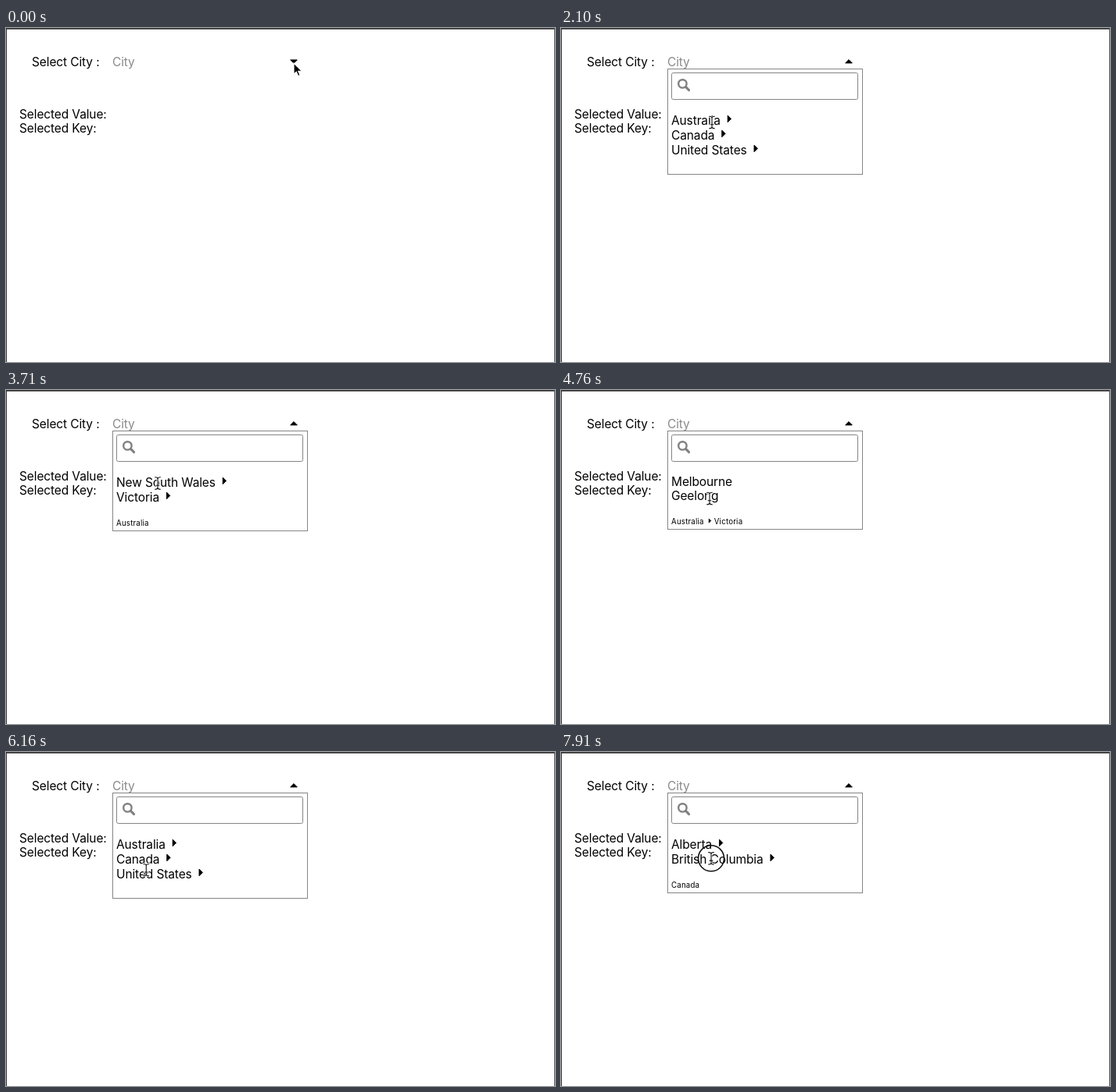
Animation, 702 px wide and 428 px high, one loop 8000 ms. Source, as an HTML page:

```html
<!DOCTYPE html>
<html lang="en">
<head>
<meta charset="utf-8">
<title>City picker</title>
<style>
  html, body { margin: 0; width: 100%; height: 100%; overflow: hidden; background: #fff; }
  svg { display: block; }
  text { font: 15.5px Inter, "Liberation Sans", sans-serif; letter-spacing: -.12px; white-space: pre; }
  .small { font-size: 9.7px; letter-spacing: .2px; }
  .caret { stroke: #000; stroke-linejoin: round; }
  .frame { fill: #fff; stroke: #858585; }
</style>
</head>
<body>
<svg width="702" height="428" viewBox="0 0 702 428">
  <rect width="702" height="428" fill="#fff"/>
  <path d="M0 0H702V1.7H0Z M0 0H1V428H0Z" fill="#333"/>
  <path d="M701 0H702V428H701Z" fill="#555"/>
  <text x="33" y="49">Select City :</text>
  <text x="136" y="49" fill="#8a8a8a">City</text>
  <text x="17" y="116">Selected Value:</text>
  <text x="17" y="134">Selected Key:</text>
  <path id="toggle" class="caret"/>
  <g id="menu">
    <rect id="panel" class="frame" x="136.5" y="52.5" width="249"/>
    <rect class="frame" x="141.5" y="57.5" width="238" height="34" rx="2"/>
    <g fill="none" stroke="#808080">
      <circle cx="155.4" cy="71.4" r="5.2" stroke-width="2.4"/>
      <path d="M159.4 75.4L163.6 79.6" stroke-width="3" stroke-linecap="round"/>
    </g>
    <g id="rows"></g>
  </g>
  <circle id="ring" fill="none" stroke="#111" stroke-width="1.5"/>
  <path id="arrow" d="M0 0V14.2L3.3 11.1L5.7 16.6L8 15.6L5.7 10.2H10.2Z" stroke="#fff" stroke-width="1.1"/>
  <g id="beam" fill="none" stroke-linecap="round">
    <path id="halo" stroke="#fff" stroke-width="2.8"/>
    <path id="stem" stroke="#111" stroke-width="1.1"/>
  </g>
</svg>
<script>
const $ = id => document.getElementById(id);
const LOOP = 8000, TICK = 70, HOLD = 140, LEFT = 141;

const views = {
  countries: { rows: ["Australia", "Canada", "United States"], crumbs: [] },
  states: { rows: ["New South Wales", "Victoria"], crumbs: ["Australia"] },
  cities: { rows: ["Melbourne", "Geelong"], crumbs: ["Australia", "Victoria"], leaf: true },
  provinces: { rows: ["Alberta", "British Columbia"], crumbs: ["Canada"] }
};

// Each click shows the ring, then opens a view
const clicks = [
  { at: 770, opens: "countries" },
  { at: 2170, opens: "states" },
  { at: 4060, opens: "cities" },
  { at: 5670, opens: "countries" },
  { at: 6930, opens: "provinces" },
  { at: 7840 }
];

// Pointer moves: from, until, x, y
const moves = [
  [140, 350, 366.6, 43.4],
  [1190, 1890, 200, 133],
  [1890, 2100, 193, 121],
  [2730, 2940, 194, 119.5],
  [3710, 3990, 189, 133],
  [4200, 4340, 189, 124],
  [4690, 4760, 190, 139],
  [4970, 5460, 172, 165],
  [5950, 6480, 193, 125],
  [6480, 6650, 190, 134],
  [7490, 7770, 192, 136.3]
];

const ease = p => p * p * (3 - 2 * p);
const clamp = p => Math.min(1, Math.max(0, p));

function pointer(t) {
  let x = 368, y = 45;
  for (const [from, until, toX, toY] of moves) {
    const p = ease(clamp((t - from) / (until - from)));
    x += (toX - x) * p;
    y += (toY - y) * p;
  }
  return [x, y];
}

const show = (el, on) => el.setAttribute("display", on ? "inline" : "none");
const place = (el, x, y, k = 1) => el.setAttribute("transform", `translate(${x} ${y}) scale(${k})`);

function add(tag, attrs) {
  const el = document.createElementNS("http://www.w3.org/2000/svg", tag);
  for (const key in attrs) el.setAttribute(key, attrs[key]);
  return $("rows").appendChild(el);
}

// Adds a label and returns where it ends
function label(text, x, y, cls = "") {
  const el = add("text", { x, y, class: cls });
  el.textContent = text;
  return x + el.getComputedTextLength();
}

const caret = (x, y, k) => place(add("path", { class: "caret", d: "M0-4.3V4.3L4.3 0Z" }), x, y, k);

function fill({ rows, crumbs, leaf }) {
  $("rows").replaceChildren();
  const step = leaf ? 18 : 19;
  rows.forEach((name, i) => {
    const y = 105 + step * (i + 1);
    const end = label(name, LEFT, y);
    if (!leaf) caret(end + 9.4, y - 7.6);
  });

  const bottom = 130.5 + step * rows.length + (crumbs.length ? 12 : 0);
  const y = bottom - 6.5;
  let x = LEFT;
  crumbs.forEach((name, i) => {
    if (i) {
      caret(x + 6.4, y - 4.4, .62);
      x += 13;
    }
    x = label(name, x, y, "small");
  });
  $("panel").setAttribute("height", bottom - 52.5);
}

const beamShape = "M-3.4-7.7Q-.4-7.7 0-6Q.4-7.7 3.4-7.7M0-6V6M-3.4 7.7Q-.4 7.7 0 6Q.4 7.7 3.4 7.7M-1.9 2.8H1.9";
$("halo").setAttribute("d", beamShape);
$("stem").setAttribute("d", beamShape);

let current;
function setView(name) {
  if (name === current) return;
  current = name;
  show($("menu"), name);
  $("toggle").setAttribute("d", name ? "M363.7 44.9H372.3L368 40.6Z" : "M363.7 40.9H372.3L368 45.2Z");
  if (name) fill(views[name]);
}

function draw(ms) {
  const t = Math.floor((ms % LOOP) / TICK) * TICK;
  const opened = clicks.filter(c => c.opens && c.at + HOLD <= t).pop();
  setView(opened ? opened.opens : null);

  const [x, y] = pointer(t), isArrow = t < 1330;
  show($("arrow"), isArrow);
  show($("beam"), !isArrow);
  place($(isArrow ? "arrow" : "beam"), x, y);

  show($("ring"), clicks.some(c => t >= c.at && t < c.at + HOLD));
  $("ring").setAttribute("r", isArrow ? 21.5 : 16.5);
  place($("ring"), x, y);
}

let start;
function loop(now) {
  start ??= now;
  draw(Math.max(0, now - start));
  requestAnimationFrame(loop);
}
draw(0);
requestAnimationFrame(loop);
</script>
</body>
</html>
```
